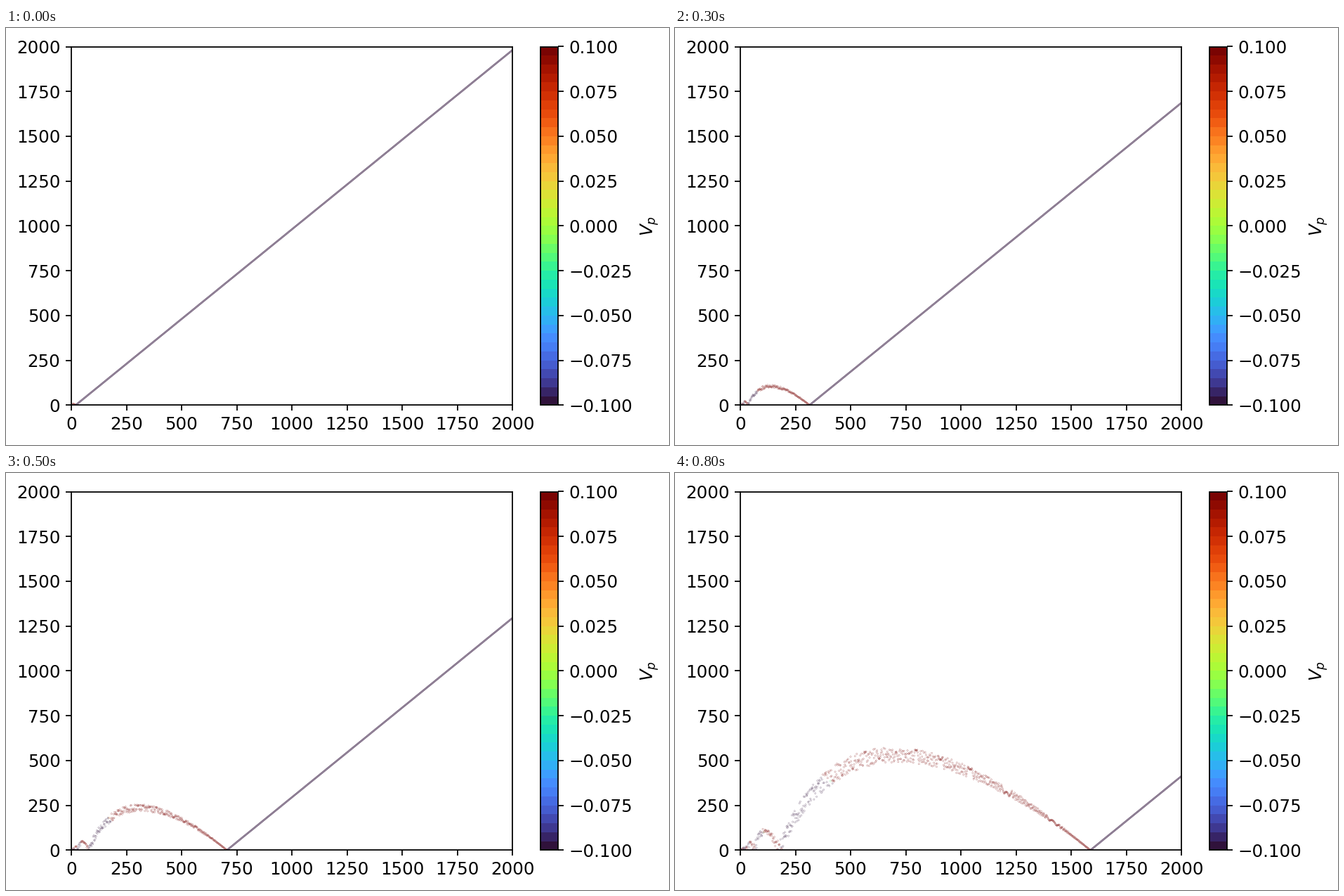
Recreate the animation shown at these times as a matplotlib script. Size 944 by 593 pixels, loop 900 ms.

```python
import numpy as np
import matplotlib.pyplot as plt
from matplotlib.animation import FuncAnimation
from matplotlib.cm import ScalarMappable
from matplotlib.colors import Normalize

W, H, DPI = 944, 593, 160
FRAMES, INTERVAL = 9, 100
G, DT, STIFF = 9.8, 0.001, 5e5   # gravity, time step, floor stiffness
STEPS = 2000                     # steps between two pictures

plt.rcParams.update({"font.family": "DejaVu Sans", "font.size": 11})


def drop(heights):
    """Let balls fall on a springy floor; yield heights and speeds."""
    y, v = heights.copy(), np.zeros_like(heights)
    for _ in range(FRAMES):
        for _ in range(STEPS):
            v -= (G + STIFF * np.minimum(y, 0)) * DT
            y += v * DT
        yield y.copy(), v.copy()


def box(x0, y0, x1, y1):
    """Axes at a pixel box measured from the top left."""
    return fig.add_axes([x0 / W, 1 - y1 / H, (x1 - x0) / W, (y1 - y0) / H])


start = np.arange(0, 2001, 2.0)
states = list(drop(start))

fig = plt.figure(figsize=(W / DPI, H / DPI), dpi=DPI, facecolor="white")
ax = box(93, 26.5, 721, 536.3)
ax.set(xlim=(0, 2000), ylim=(0, 2000))
ticks = np.arange(0, 2001, 250)
ax.set_xticks(ticks)
ax.set_yticks(ticks)

cmap = plt.get_cmap("turbo", 40)
norm = Normalize(-0.1, 0.1)
bar = fig.colorbar(ScalarMappable(norm, cmap), cax=box(760.5, 26.5, 786, 536.3))
bar.set_label("$V_p$")

dots = ax.scatter(start, start, s=1, facecolors="none", linewidths=0.1)


def update(i):
    y, v = states[i]
    dots.set_offsets(np.column_stack([start, y]))
    dots.set_edgecolors(cmap(norm(v)))
    return (dots,)


anim = FuncAnimation(fig, update, frames=FRAMES, interval=INTERVAL,
                     init_func=lambda: update(0), repeat=True)
plt.show()
```
